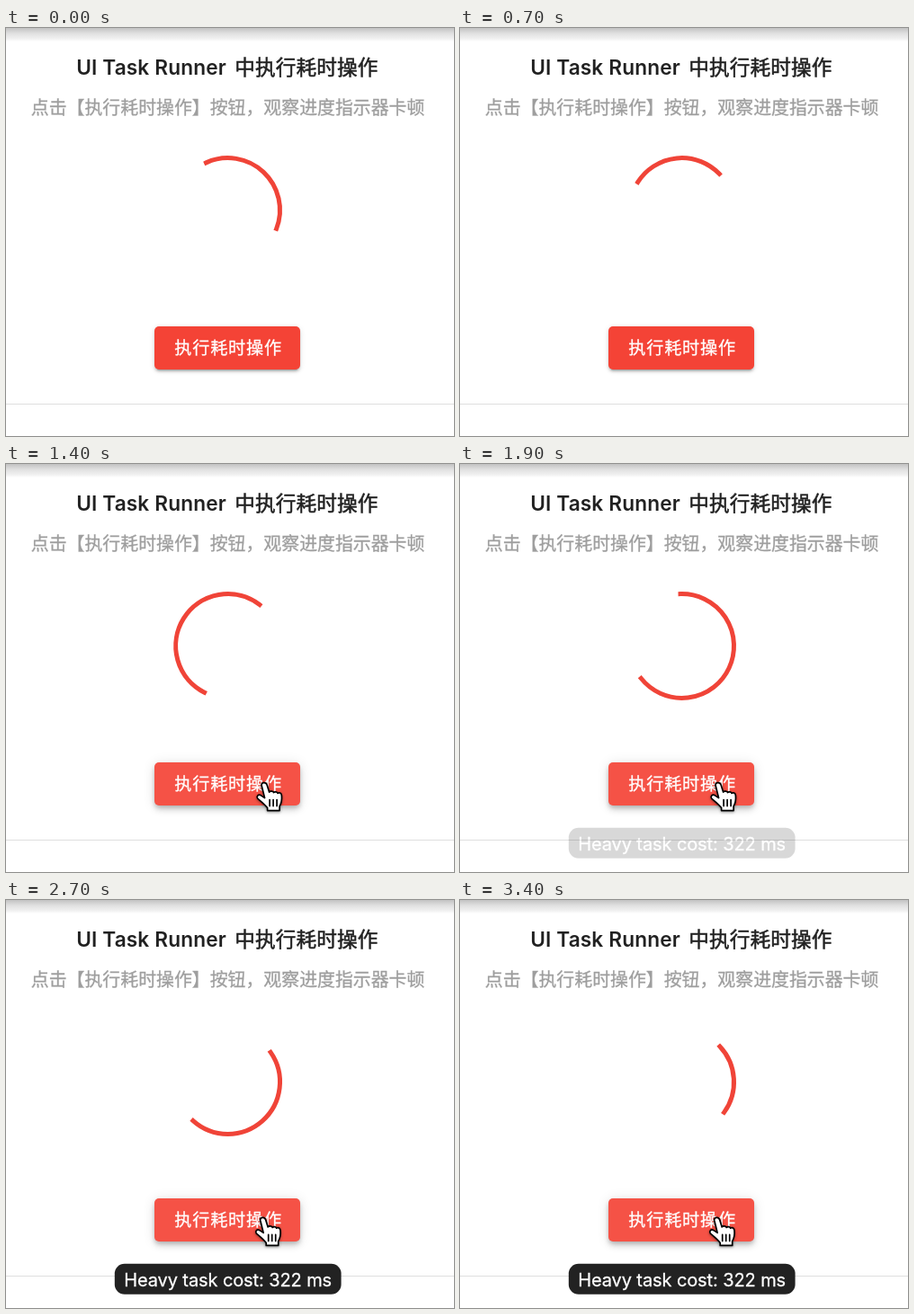
Animation, 498 px wide and 454 px high, one loop 3.5 s. Source, as an HTML page:

```html
<!DOCTYPE html>
<html lang="zh-CN">
<head>
<meta charset="utf-8">
<style>
  html, body { margin: 0; width: 100%; height: 100%; overflow: hidden; background: #fff; }
  #stage { position: absolute; left: 0; top: 0; width: 498px; height: 454px; overflow: hidden; }
  #bar { position: absolute; left: 0; top: 0; width: 100%; height: 15px;
    background: linear-gradient(#c2c2c2, #e0e0e0 6px, #f1f1f1 12px, #fff 15px); }
  #rule { position: absolute; left: 0; top: 418px; width: 100%; height: 1.4px; background: #dfdfdf; }
  #button { position: absolute; left: 165.4px; top: 331.5px; width: 162px; height: 48px;
    border-radius: 5px; background: #f44336;
    box-shadow: 0 4px 1.3px -2.7px #0003, 0 2.7px 2.7px #00000024, 0 1.3px 6.7px #0000001f; }
  #button.hover { background: #f55246;
    box-shadow: 0 2.7px 5.3px -1.3px #0003, 0 5.3px 6.7px #0000001c, 0 1.3px 13.3px #0000001f; }
  svg { position: absolute; left: 0; top: 0; }
  text { font-family: Inter, "Noto Sans CJK SC", "Noto Sans CJK", sans-serif; }
  .medium { stroke-width: .5px; }
  .book { stroke-width: .3px; }
</style>
</head>
<body>
<div id="stage">
  <div id="bar"></div>
  <div id="rule"></div>
  <div id="button"></div>
  <svg width="498" height="454" viewBox="0 0 498 454">
    <g fill="#212121" font-size="22.67">
      <text x="78.2" y="52" font-weight="600" letter-spacing=".13">UI Task Runner</text>
      <text x="254.3" y="52" letter-spacing=".1" class="medium" stroke="#212121">中执行耗时操作</text>
    </g>
    <text x="27.8" y="95.5" font-size="19.9" fill="#9e9e9e" class="book" stroke="#9e9e9e">点击【执行耗时操作】按钮，观察进度指示器卡顿</text>
    <text x="187.3" y="363.2" font-size="19.2" letter-spacing=".75" fill="#fff" class="book" stroke="#fff">执行耗时操作</text>
    <path id="arc" fill="none" stroke="#f04438" stroke-width="5" stroke-linecap="square"/>
    <g id="toast">
      <rect x="120.8" y="404.8" width="251.8" height="34" rx="11" fill="#222"/>
      <text x="131.2" y="430" font-size="20" letter-spacing="-.1" fill="#fff" class="book" stroke="#fff">Heavy task cost: 322 ms</text>
    </g>
    <g id="cursor" style="filter: drop-shadow(0 1.5px 1.5px #0006)">
      <path id="arrow" d="M0 0V22L5 17.5L8.5 25.5L12 24L8.7 16.2H15.5Z" stroke="#fff" stroke-width="1.5"/>
      <g id="hand" fill="#fff" stroke="#000" stroke-width="1.7" stroke-linejoin="round" stroke-linecap="round">
        <path d="M-2.5 3C-3-1 2.5-1 3.5 2.5L6 10.5c1-1.6 4.5-1.3 5 .5c1-1.3 4-1 4.5 .8c1.5-1.2 4-.5 4.3 2.5c.5 5 0 8.2-2.3 12V31H4V28C1 24-3 21-7 17.5C-8.5 15-6 12.5-3.5 14L1 17Z"/>
        <path d="M6.5 19v7M10.5 19v7M14.5 19v7"/>
      </g>
    </g>
  </svg>
</div>
<script>
const LOOP = 3500, STEP = 100;
const PATH_MS = 1333, TURN_MS = 2222;
const CX = 246.6, CY = 202.5, R = 57.9;
const FREEZE = [1520, 1800];
// time, x, y of the pointer tip
const POINTER = [
  [900, 436, 436], [1000, 388, 409], [1100, 334, 378],
  [1200, 297, 360], [1300, 286.6, 354.6], [2400, 285.2, 353.4]
];
const HOVER_AT = 1200;
const $ = id => document.getElementById(id);
const clamp = v => Math.min(1, Math.max(0, v));

// cubic-bezier(.4, 0, .2, 1)
function ease(x) {
  x = clamp(x);
  let lo = 0, hi = 1, s = x;
  for (let i = 0; i < 24; i++) {
    s = (lo + hi) / 2;
    const bx = 1.2 * (1 - s) ** 2 * s + .6 * (1 - s) * s * s + s ** 3;
    if (bx < x) lo = s; else hi = s;
  }
  return s * s * (3 - 2 * s);
}

function point(deg) {
  const a = deg * Math.PI / 180;
  return (CX + R * Math.sin(a)).toFixed(2) + ' ' + (CY - R * Math.cos(a)).toFixed(2);
}

function drawArc(t) {
  if (t > FREEZE[0] && t < FREEZE[1]) t = FREEZE[0];
  const u = (.1755 + t / PATH_MS) % 1;
  const head = ease(u * 2), tail = ease(u * 2 - 1);
  const start = -40.4 + 360 * t / TURN_MS + 90 * u + 270 * tail;
  const sweep = Math.max(270 * (head - tail), .1);
  $('arc').setAttribute('d',
    `M${point(start)}A${R} ${R} 0 ${sweep > 180 ? 1 : 0} 1 ${point(start + sweep)}`);
}

function drawPointer(t) {
  const spot = POINTER.filter(p => p[0] <= t).pop();
  const hover = t >= HOVER_AT;
  $('cursor').style.display = spot ? '' : 'none';
  if (spot) $('cursor').setAttribute('transform', `translate(${spot[1]} ${spot[2]})`);
  $('arrow').style.display = hover ? 'none' : '';
  $('hand').style.display = hover ? '' : 'none';
  $('button').className = hover ? 'hover' : '';
}

function draw(ms) {
  const t = Math.floor(ms % LOOP / STEP) * STEP;
  drawArc(t);
  drawPointer(t);
  $('toast').setAttribute('opacity', clamp((t - 1860) / 230));
}

const began = performance.now();
function tick() {
  draw(performance.now() - began);
  requestAnimationFrame(tick);
}
tick();
</script>
</body>
</html>
```
